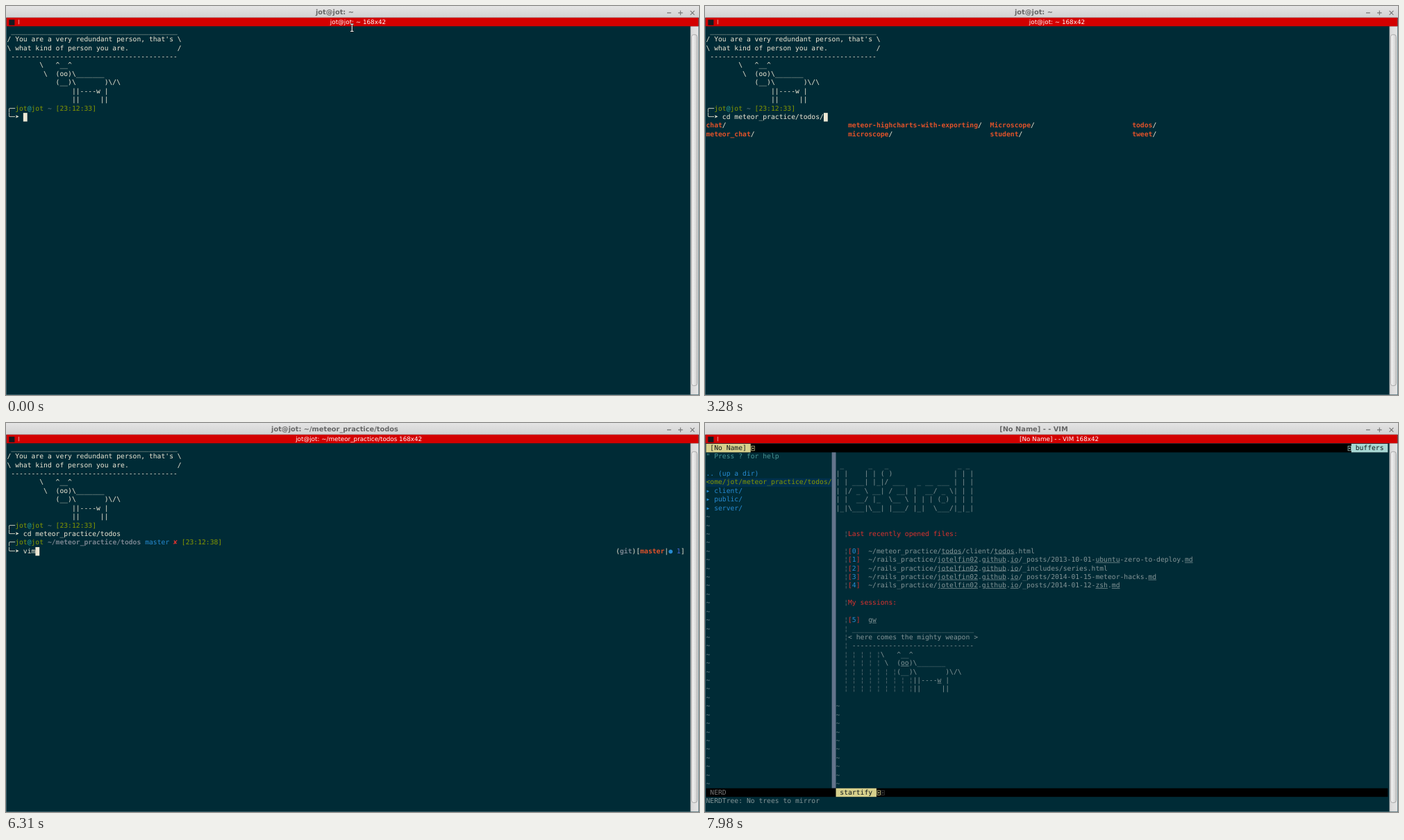
An HTML page that plays this animation: 998x561 px, repeating every 8 s.

```html
<!DOCTYPE html>
<html lang="en">
<head>
<meta charset="utf-8">
<title>Terminal session</title>
<style>
html, body { margin: 0; width: 100%; height: 100%; overflow: hidden; background: #002b36; }
#stage {
  position: absolute; left: 0; top: 0; width: 1366px; height: 768px; overflow: hidden;
  transform: scale(calc(998 / 1366)); transform-origin: 0 0;
  background: #002b36; color: #eee8d5; text-rendering: geometricPrecision;
}
#stage div, #stage svg { position: absolute; }
#titlebar { left: 0; top: 0; width: 1366px; height: 23px; background: linear-gradient(#e4e4e4, #d2d2d2); }
#title {
  left: 248px; width: 800px; top: 3px; line-height: 20px; text-align: center; white-space: pre;
  font: bold 13.45px/20px "DejaVu Sans", sans-serif; color: #666;
}
#bar { left: 1px; top: 23px; width: 1364px; height: 17px; background: #d30000; }
#info { top: 23px; white-space: pre; color: #fff; font: 12px/17px "DejaVu Sans", sans-serif; }
#icon { left: 6px; top: 27px; width: 11px; height: 11px; background: #141a20; }
#tick { left: 25px; top: 27px; width: 1px; height: 9px; background: #f4d0d0; }
#scroll { left: 1349px; top: 40px; width: 16px; height: 727px; background: linear-gradient(90deg, #bdbdbd, #dcdcdc 20%, #e4e4e4); }
#thumb {
  left: 2px; top: 16px; width: 10px; height: 692px; border: 1px solid #969696; border-radius: 5px;
  background: linear-gradient(90deg, #f6f6f6, #cfcfcf);
}
#edge { left: 0; top: 23px; width: 1364px; height: 744px; border: 1px solid #587880; border-top: 0; }
#screen { left: 2px; top: 41px; width: 1344px; height: 714px; font: 13.29px/17px "DejaVu Sans Mono", monospace; }
#screen div { white-space: pre; height: 17px; }
#cursor { width: 8px; background: #eee8d5; color: #002b36; }
b { color: #e0522a; }
.green { color: #859900; }
.cyan { color: #2aa198; }
.blue { color: #268bd2; }
.red { color: #dc322f; }
.violet { color: #4468d8; }
.path { color: #77838f; font-weight: bold; }
.text { color: #839496; }
.help { color: #4a9494; }
.dim { color: #657b83; }
.guide { color: #586e75; }
.gray { color: #777; }
.dark { color: #10181a; }
#screen .hex {
  width: 5px; height: 8px; margin: 4px 0 0 1px; border: 1px solid;
  background: linear-gradient(currentColor, currentColor) 1px 3px / 3px 2px no-repeat;
}
</style>
</head>
<body>
<div id="stage">
  <div id="edge"></div>
  <div id="titlebar"></div>
  <div id="title"></div>
  <svg width="70" height="23" style="left:1296px;top:0" fill="none" stroke="#777" stroke-width="1.5">
    <path d="M7 13.5h8M29 13.5h9M33.5 9v9M53 9.500l8 8M61 9.500l-8 8"/>
  </svg>
  <div id="screen"></div>
  <div id="scroll"><div id="thumb"></div></div>
  <div id="bar"></div>
  <div id="icon"></div>
  <div id="tick"></div>
  <div id="info"></div>
  <svg id="bell" width="14" height="16" style="left:1348px;top:24px">
    <circle cx="7" cy="6.500" r="5" fill="#ddd" stroke="#8a8a8a" stroke-width="1.500"/>
    <path d="M7 6v8M4.500 13.500h5" stroke="#777" stroke-width="2"/>
  </svg>
  <svg id="beam" width="10" height="18" style="left:677px;top:34px" fill="none">
    <path d="M2 2h2.500l.5 1 .5-1H8M5 3v12M2 16h2.500l.5-1 .5 1H8" stroke="#222" stroke-width="3"/>
    <path d="M2 2h2.500l.5 1 .5-1H8M5 3v12M2 16h2.500l.5-1 .5 1H8" stroke="#fff" stroke-width="1.400"/>
  </svg>
  <svg id="arrow" width="14" height="22" style="left:679px;top:40px">
    <path d="M1.500 1.500v15l3.500-3 2.500 6 2.500-1-2.500-6h4.500z" fill="#fff" stroke="#222"/>
  </svg>
</div>
<script>
const LOOP = 8000, CW = 8, RH = 17;
const $ = id => document.getElementById(id);
const screen_ = $('screen');
const timed = [];

function show(el, from, to) { timed.push({ el, from, to }); return el; }

function layer(from, to) {
  const el = document.createElement('div');
  screen_.append(el);
  return show(el, from, to);
}

function place(el, row, col) {
  el.style.left = col * CW + 'px';
  el.style.top = row * RH + 'px';
}

function put(parent, row, col, html, cls = '') {
  const el = document.createElement('div');
  el.className = cls;
  el.innerHTML = html;
  place(el, row, col);
  parent.append(el);
  return el;
}

function fill(parent, row, col, cols, rows, color) {
  const el = put(parent, row, col, '');
  el.style.cssText += `width:${cols * CW}px;height:${rows * RH}px;background:${color}`;
}

const lines = (parent, row, col, list, cls) =>
  list.forEach((s, i) => put(parent, row + i, col, s, cls));

const tildes = (parent, from, col) => {
  for (let r = from; r < 40; r++) put(parent, r, col, '~', 'dim');
};

const hex = (parent, row, col, color) => { put(parent, row, col, '', 'hex').style.color = color; };

const cow = [
  '        \\   ^__^',
  '         \\  (oo)\\_______',
  '            (__)\\       )\\/\\',
  '                ||----w |',
  '                ||     ||'
];

// Shell
const shell = layer(0, 6770);
lines(shell, 0, 0, [
  ' ' + '_'.repeat(41),
  "/ You are a very redundant person, that's \\",
  '\\ what kind of person you are.'.padEnd(42) + '/',
  ' ' + '-'.repeat(41),
  ...cow
]);

function prompt(parent, row) {
  put(parent, row, 0, '╭─');
  put(parent, row, 2, 'jot<span class="cyan">@</span>jot', 'green');
  put(parent, row + 1, 0, '╰─');
  put(parent, row + 1, 2, '➤');
}
prompt(shell, 9);
put(shell, 9, 10, '~', 'dim');
put(shell, 9, 12, '[23:12:33]', 'green');
const cmd = put(shell, 10, 4, '');

const list = layer(2350, 3710);
[['chat', 'meteor_chat'], ['meteor-highcharts-with-exporting', 'microscope'],
 ['Microscope', 'student'], ['todos', 'tweet']].forEach((pair, i) =>
  lines(list, 11, i * 35, pair.map(s => `<b>${s}</b>/`)));

const repo = layer(3800, 6770);
prompt(repo, 11);
put(repo, 11, 10, '~/meteor_practice/todos', 'path');
put(repo, 11, 34, 'master', 'blue');
put(repo, 11, 41, '✘', 'red');
put(repo, 11, 43, '[23:12:38]', 'green');
put(repo, 12, 150, '(<span class="path">git</span>)[<b>master</b>|');
put(repo, 12, 163, '●', 'blue');
put(repo, 12, 165, '1', 'violet');
put(repo, 12, 166, ']');
const cmd2 = put(repo, 12, 4, '');

// Editor
put(layer(6840, 6930), 1, 0, '▽');

const YELLOW = '#d7d08c', AQUA = '#a8d8d4', LINE = '#00304c';
const vim = layer(6930, LOOP);
fill(vim, 0, 0, 168, 1, '#000');
fill(vim, 0, 0, 11, 1, YELLOW);
put(vim, 0, 1, '[No Name]', 'dark');
hex(vim, 0, 11, YELLOW);
hex(vim, 0, 158, AQUA);
fill(vim, 0, 159, 9, 1, AQUA);
put(vim, 0, 160, 'buffers', 'dark');
put(vim, 1, 0, '" Press ? for help', 'help');
put(vim, 3, 0, '.. (up a dir)', 'blue');
fill(vim, 4, 0, 31, 1, LINE);
put(vim, 4, 0, '&lt;ome/jot/meteor_practice/todos/', 'green');
['client/', 'public/', 'server/'].forEach((s, i) => {
  put(vim, 5 + i, 0, '▸', 'blue');
  put(vim, 5 + i, 2, s, 'blue');
});
tildes(vim, 8, 0);
fill(vim, 1, 31, 1, 39, '#64748c');
fill(vim, 40, 0, 168, 1, '#000');
put(vim, 41, 0, 'NERDTree: No trees to mirror', 'text');

function status(parent, col, name) {
  const n = name.length + 2;
  fill(parent, 40, col, n, 1, YELLOW);
  put(parent, 40, col + 1, name, 'dark');
  hex(parent, 40, col + n, YELLOW);
  hex(parent, 40, col + n + 1, '#444');
}

const blank = layer(6930, 7010);
fill(blank, 1, 36, 132, 1, LINE);
put(blank, 1, 34, '0', 'text');
tildes(blank, 2, 32);
status(blank, 0, 'NERD');
[[33, '[No Name]'], [143, '[unix]'], [152, '100%'], [157, '⌓'], [161, '0:'], [165, '0']]
  .forEach(([col, s]) => put(blank, 40, col, s, 'gray'));

const start = layer(7010, LOOP);
lines(start, 2, 32, [
  ' _      _   _                 _ _',
  '| |    | | ( )               | | |',
  '| | ___| |_|/ ___   _ __ ___ | | |',
  '| |/ _ \\ __| / __| |  __/ _ \\| | |',
  '| |  __/ |_  \\__ \\ | | | (_) | | |',
  '|_|\\___|\\__| |___/ |_|  \\___/|_|_|'
], 'text');
put(start, 10, 35, 'Last recently opened files:', 'red');
put(start, 18, 35, 'My sessions:', 'red');

const site = '~/rails_practice/<u>jotelfin02</u>.<u>github</u>.<u>io</u>/';
[
  '~/meteor_practice/<u>todos</u>/client/<u>todos</u>.html',
  site + '_posts/2013-10-01-<u>ubuntu</u>-zero-to-deploy.<u>md</u>',
  site + '_includes/series.html',
  site + '_posts/2014-01-15-meteor-hacks.<u>md</u>',
  site + '_posts/2014-01-12-<u>zsh</u>.<u>md</u>',
  '<u>gw</u>'
].forEach((s, i) => {
  const row = i < 5 ? 12 + i : 20;
  put(start, row, 35, `[<span class="blue">${i}</span>]`, 'red');
  put(start, row, 40, s, 'text');
});
lines(start, 21, 35, [
  ' ' + '_'.repeat(30),
  '&lt; here comes the mighty weapon >',
  ' ' + '-'.repeat(30),
  ...cow.map(s => s.replace('oo', '<u>oo</u>').replace('w', '<u>w</u>'))
], 'text');
[10, 12, 13, 14, 15, 16, 18, 20, 21, 22, 23].forEach(r => put(start, r, 34, '¦', 'guide'));
[5, 5, 7, 9, 9].forEach((n, i) => put(start, 24 + i, 34, '¦ '.repeat(n), 'guide'));
tildes(start, 30, 32);
put(start, 40, 1, 'NERD', 'gray');
status(start, 32, 'startify');

const cursor = put(screen_, 0, 0, '');
cursor.id = 'cursor';

show($('bell'), 2280, 3280);
show($('beam'), 0, 1150);
show($('arrow'), 6770, 7980);

// Timeline: [start, value...]
const dir = 'cd meteor_practice/';
const typed = [[0, ''], [1070, 'c'], [1230, 'cd'], [1310, 'cd '], [1570, 'cd m'], [1690, 'cd me'],
  [1880, dir], [3060, dir + 't'], [3130, dir + 'to'], [3210, dir + 'todos/'], [3710, dir + 'todos']];
const typed2 = [[0, ''], [6120, 'v'], [6220, 'vi'], [6310, 'vim']];
const home = 'jot@jot: ~', deep = home + '/meteor_practice/todos';
const titles = [
  [0, home, 639], [2280, home, 629], [3280, home, 639], [3800, deep, 571],
  [6550, 'vim', 658.5], [6930, '[No Name] - VIM', 658.5], [7010, '[No Name] - - VIM', 620]
];
const spots = [[0, 10, 4], [3710, 11, 0], [3800, 12, 4], [6470, 13, 0], [6770, 0, 0], [7010, 12, 36]];
const off = [[410, 990], [2850, 3060], [4230, 4830], [5430, 6030], [6930, 7010], [7470, LOOP]];

const at = (keys, t) => keys.findLast(k => k[0] <= t);
const setText = (el, s) => { if (el.textContent !== s) el.textContent = s; };

function draw(t) {
  for (const { el, from, to } of timed) el.style.display = t >= from && t < to ? '' : 'none';

  const [, name, left] = at(titles, t);
  setText($('title'), name);
  setText($('info'), name + ' 168x42');
  $('info').style.left = left + 'px';

  const line = at(typed, t)[1], line2 = at(typed2, t)[1];
  setText(cmd, line);
  setText(cmd2, line2);

  let [from, row, col] = at(spots, t);
  if (from === 0) col += line.length;
  if (from === 3800) col += line2.length;
  place(cursor, row, col);
  setText(cursor, from === 7010 ? '0' : '');
  cursor.style.display = off.some(([a, b]) => t >= a && t < b) ? 'none' : '';
}

const begin = performance.now();
function tick() {
  draw((performance.now() - begin) % LOOP);
  requestAnimationFrame(tick);
}
tick();
</script>
</body>
</html>
```
